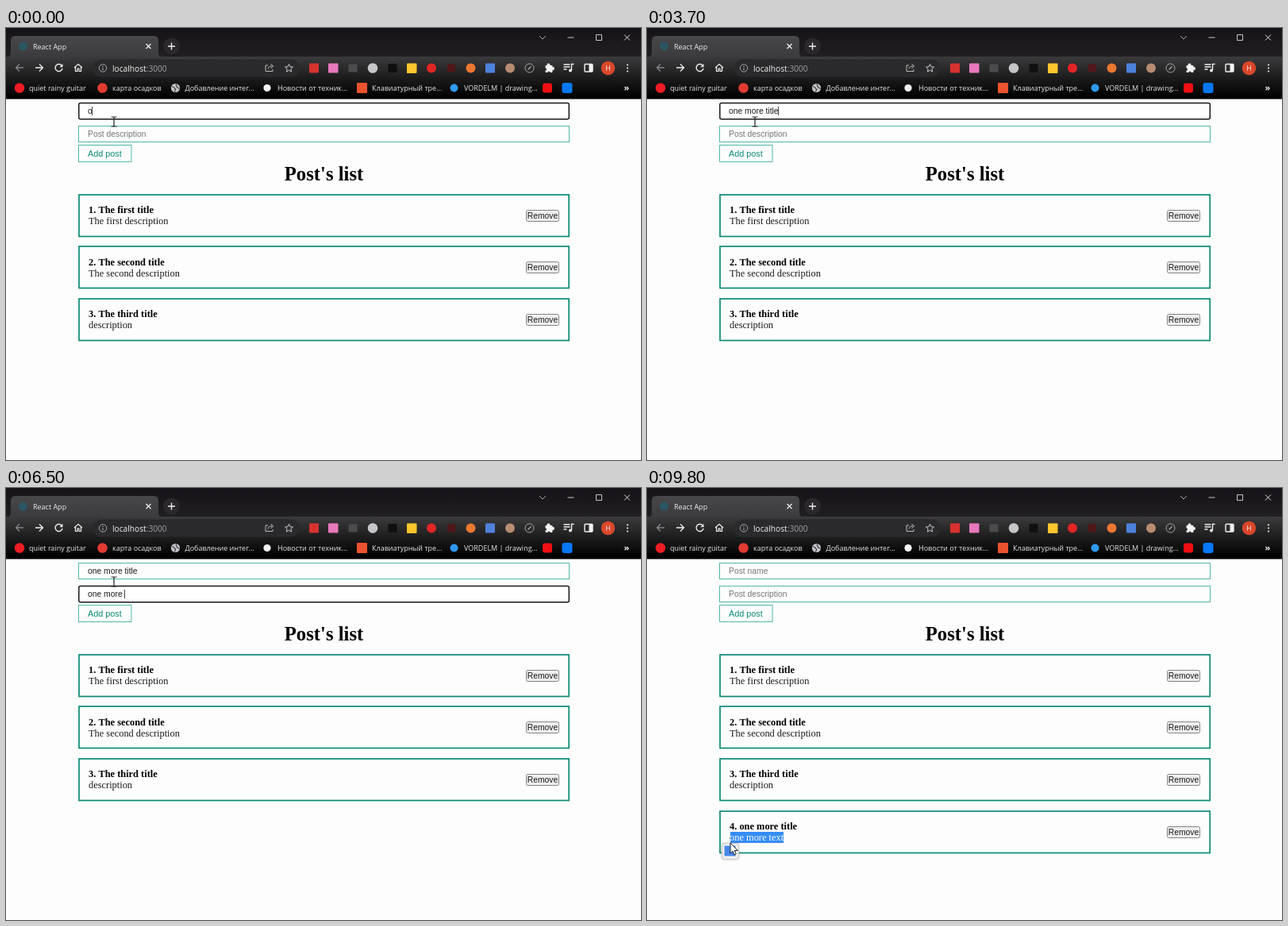
An HTML page with a canvas that plays this animation: 800x544 px, repeating every 9.9 s.

```html
<!DOCTYPE html>
<html lang="en">
<head>
<meta charset="utf-8">
<title>React App</title>
<style>
html, body { margin: 0; width: 100%; height: 100%; overflow: hidden; background: #fefdfe; }
canvas { display: block; width: 800px; height: 544px; }
</style>
</head>
<body>
<canvas id="stage" width="800" height="544"></canvas>
<script>
const ctx = document.getElementById('stage').getContext('2d');
const LOOP = 9900, STEP = 100;
const UI = '"Open Sans", "Noto Sans", sans-serif';
const SANS = '"Liberation Sans", Arial, sans-serif';
const SERIF = '"Liberation Serif", "Times New Roman", serif';
const GREEN = '#0a8a76', PALE = '#4fb7a4', INK = '#1a1a1a';

const TITLE = 'one more title', BODY = 'one more text';
const TITLE_KEYS = [0, 300, 500, 700, 1000, 1200, 1500, 1700, 2000, 2300, 2600, 2900, 3200, 3500];
const BODY_KEYS = [4500, 4700, 4900, 5100, 5400, 5700, 5900, 6200, 6500, 6700, 7000, 7200, 7500];
const TAB_KEY = 4200, ENTER = 7900, PRESS = 8900, RELEASE = 9300, POPUP = 9500;
const MOUSE = [[ENTER, 136, 118], [8300, 158, 300], [8600, 185, 466], [PRESS, 173, 443], [RELEASE, 105, 447]];

function text(str, x, y, font, color, align = 'left') {
  ctx.font = font;
  ctx.fillStyle = color;
  ctx.textAlign = align;
  ctx.fillText(str, x, y);
}

function rect(x, y, w, h, color) {
  ctx.fillStyle = color;
  ctx.fillRect(x, y, w, h);
}

function frame(x, y, w, h, color, lw = 1) {
  ctx.strokeStyle = color;
  ctx.lineWidth = lw;
  ctx.strokeRect(x, y, w, h);
}

function round(x, y, w, h, r, fill, stroke, lw = 1) {
  ctx.beginPath();
  ctx.roundRect(x, y, w, h, r);
  paint(fill, stroke, lw);
}

function disc(x, y, r, fill, stroke, lw = 1) {
  ctx.beginPath();
  ctx.arc(x, y, r, 0, Math.PI * 2);
  paint(fill, stroke, lw);
}

function paint(fill, stroke, lw) {
  if (fill) { ctx.fillStyle = fill; ctx.fill(); }
  if (stroke) { ctx.strokeStyle = stroke; ctx.lineWidth = lw; ctx.stroke(); }
}

function icon(d, color, x, y, lw = 1.2, fill) {
  ctx.save();
  ctx.translate(x, y);
  const path = new Path2D(d);
  if (fill) { ctx.fillStyle = fill; ctx.fill(path); }
  if (color) { ctx.strokeStyle = color; ctx.lineWidth = lw; ctx.stroke(path); }
  ctx.restore();
}

function shade(y0, y1, c0, c1) {
  const g = ctx.createLinearGradient(0, y0, 0, y1);
  g.addColorStop(0, c0);
  g.addColorStop(1, c1);
  return g;
}

function drawTabs() {
  rect(0, 0, 800, 37, shade(0, 37, '#151317', '#211f22'));
  rect(0, 36, 800, 53.5, shade(36, 88, '#3b3a3c', '#000'));
  ctx.beginPath();
  ctx.moveTo(2, 37);
  ctx.quadraticCurveTo(6, 36, 6, 31);
  ctx.lineTo(6, 16);
  ctx.quadraticCurveTo(6, 10, 12, 10);
  ctx.lineTo(186, 10);
  ctx.quadraticCurveTo(192, 10, 192, 16);
  ctx.lineTo(192, 31);
  ctx.quadraticCurveTo(192, 36, 197, 37);
  paint(shade(10, 37, '#48474a', '#3b3a3c'));
  disc(21.5, 23, 5.5, '#2a5763');
  text('React App', 34, 26.5, '9px ' + UI, '#eee');
  icon('M-3-3L3 3M3-3L-3 3', '#eee', 179.5, 23, 1.3);
  disc(208.5, 23, 10.5, '#2a282c');
  icon('M-4.5 0H4.5M0-4.5V4.5', '#eee', 208.5, 23, 1.4);
  icon('M-4-2L0 2L4-2', '#aaa', 676, 12, 1);
  icon('M-4 0H4', '#c8c8c8', 711.5, 12, 1);
  icon('M-3.5-3.5H3.5V3.5H-3.5Z', '#c8c8c8', 747, 12, 1);
  icon('M-3.5-3.5L3.5 3.5M3.5-3.5L-3.5 3.5', '#ddd', 782.5, 12, 1);
}

function drawToolbar() {
  icon('M5 0H-4.5M0-4.5L-4.5 0L0 4.5', '#858486', 17, 50, 1.3);
  icon('M-5 0H4.5M0-4.5L4.5 0L0 4.5', '#eee', 42, 50, 1.3);
  icon('M3.6-2.8A4.5 4.5 0 1 0 4.5 1', '#eee', 66.5, 50, 1.4);
  icon('M5-5V-.8H.8Z', null, 66.5, 50, 1, '#eee');
  icon('M-5 0L0-4.5L5 0M-3.5-1V4.5H-1V1H1V4.5H3.5V-1', '#eee', 91, 50, 1.2);
  round(109, 39.5, 261, 22, 11, '#2a292b');
  disc(122, 50.5, 4.7, null, '#aaa', 1);
  icon('M0-2.5V-1.2M0 0V2.6', '#bbb', 122, 50.5, 1.1);
  text('localhost', 134, 54.5, '10.2px ' + UI, '#f1f1f1');
  const hostWidth = ctx.measureText('localhost').width;
  text(':3000', 134 + hostWidth, 54.5, '10.2px ' + UI, '#a0a0a2');
  icon('M-2-3H-5V4.5H4V2M-2 1.5C-1.5-1 0-2 3-2M1.5-4.5L4.8-2L1.5.8', '#bbb', 332, 50, 1);
  icon('M0-5L1.5-1.7L5-1.4L2.4 1L3.1 4.6L0 2.7L-3.1 4.6L-2.4 1L-5-1.4L-1.5-1.7Z', '#ccc', 356.5, 50.5, 1);

  round(382, 44.5, 12, 12, 1, '#d8322f');
  round(406, 44.5, 12.5, 12, 1, '#e879bd');
  round(431.5, 45.5, 11, 10, 1, '#4c4b4d');
  disc(462, 50.5, 6.3, '#c6c6c8');
  round(481.5, 45, 11, 11, 1, '#101010');
  round(505, 44.5, 12.5, 12.5, 1, '#fbc52d');
  disc(536, 50.5, 6, '#e22525');
  round(556, 45.5, 10, 10, 1, '#51171a');
  disc(585.5, 50.5, 6, '#ec7730');
  round(604, 44.5, 12, 12, 1, '#4d82dc');
  disc(635, 50.5, 6, '#b78d72');
  disc(659.5, 50.5, 5.5, null, '#aaa', 1);
  icon('M-2 2L2-2', '#aaa', 659.5, 50.5, 1.2);

  round(679.5, 47, 9, 9, 1, '#f4f4f4');
  disc(683.5, 46.5, 2, '#f4f4f4');
  disc(689, 51, 2, '#f4f4f4');
  disc(679.5, 52, 1.5, '#252426');
  disc(684, 56, 1.5, '#252426');
  icon('M-6-4H2M-6-1H2M-6 2H-2M4 3V-4.5H7', '#eee', 708.5, 50, 1.4);
  disc(711, 53.5, 2, '#eee');
  round(729, 45.5, 10, 9.5, 1, null, '#f2f2f2', 1.4);
  rect(734.5, 45.5, 4.5, 9.5, '#f2f2f2');
  disc(758.5, 50.5, 8.7, '#d9472b');
  text('H', 758.5, 54, '9px ' + UI, '#f5e8e4', 'center');
  for (const y of [46.5, 50.5, 54.5]) disc(783, y, 1.1, '#eee');
}

function drawBookmarks() {
  const labels = [
    ['quiet rainy guitar', 29], ['карта осадков', 134], ['Добавление интег...', 225.5],
    ['Новости от техник...', 342], ['Клавиатурный тре...', 461], ['VORDELM | drawing...', 577]
  ];
  for (const [label, x] of labels) text(label, x, 78.5, '9px ' + UI, '#e6e6e6');
  disc(17, 75.5, 6.3, '#f01c23');
  disc(121.5, 75.5, 6.3, '#e13b32');
  disc(213.5, 75.5, 5.6, '#c2c4c8');
  icon('M-4.5-2C-1-1-1 1 0 1.5C1 2-1 3-1 5M1-5C0-3 2-2 2-1C3 0 4 0 5 1', '#3c3d40', 213.5, 75.5, 1.2);
  disc(329, 75.5, 4.6, '#f4f4f4');
  round(442, 69, 13, 13, 1, '#eb522f');
  disc(564.5, 75.5, 5, '#2e9af0');
  round(676, 69.5, 12, 12, 3, '#f00f12');
  round(700.5, 69, 13, 13, 3, '#0878f8');
  text('»', 782, 78.5, 'bold 11px ' + UI, '#eee', 'center');
}

function drawField(y, value, placeholder, focused, caret) {
  if (focused) round(91.8, y + .5, 617.5, 20.2, 2, '#fff', '#1a161b', 1.5);
  else frame(91.5, y + .5, 618, 20, PALE);
  text(value || placeholder, 103, y + 14, '10.33px ' + SANS, value ? INK : '#757575');
  if (focused && caret) rect(Math.floor(103 + ctx.measureText(value).width), y + 5, 1, 11, '#444');
}

function drawCard(index, title, body) {
  const y = 209 + index * 65.7, top = Math.floor(y);
  frame(92, top + 1, 617.2, 52.5, GREEN, 1.7);
  text(`${index + 1}. ${title}`, 104, Math.round(y + 24), 'bold 12.4px ' + SERIF, '#000');
  text(body, 104, Math.round(y + 38), '12.4px ' + SERIF, INK);
  round(655.5, top + 20.5, 41, 14, 2, '#efefef', '#858585', 1);
  text('Remove', 676, top + 31, '10.33px ' + SANS, INK, 'center');
}

function drawSelection(from) {
  ctx.font = '12.4px ' + SERIF;
  const end = 104 + ctx.measureText(BODY).width;
  const left = Math.max(104, from);
  if (left >= end) return;
  ctx.save();
  ctx.beginPath();
  ctx.rect(left, 433, end - left, 14);
  ctx.clip();
  rect(left, 433, end - left, 14, '#358cf6');
  text(BODY, 104, 444, '12.4px ' + SERIF, '#fff');
  ctx.restore();
}

function drawPopup() {
  ctx.save();
  ctx.shadowColor = 'rgba(0,0,0,.25)';
  ctx.shadowBlur = 2;
  round(94.5, 447.5, 21, 20, 3, '#f5f5f5', '#d0d0d0', 1);
  ctx.restore();
  rect(97.5, 450.5, 14, 13, '#4687eb');
}

function mouseAt(t) {
  if (t <= MOUSE[0][0]) return MOUSE[0].slice(1);
  for (let i = 1; i < MOUSE.length; i++) {
    const [t0, x0, y0] = MOUSE[i - 1], [t1, x1, y1] = MOUSE[i];
    if (t > t1) continue;
    const p = (t - t0) / (t1 - t0), e = p * p * (3 - 2 * p);
    return [x0 + (x1 - x0) * e, y0 + (y1 - y0) * e];
  }
  return MOUSE[MOUSE.length - 1].slice(1);
}

function drawMouse(t, x, y) {
  const beam = t <= ENTER || (t >= PRESS && t < POPUP);
  if (beam) icon('M-3.5-6H-1Q0-6 0-5Q0-6 1-6H3.5M0-5V5M-3.5 6H-1Q0 6 0 5Q0 6 1 6H3.5', '#222', x, y, 1.2);
  else icon('M0 0V13L3 10.3L5 15L7.3 14L5.2 9.5H9.3Z', '#222', x, y, 1, '#fff');
}

function draw(t) {
  const typed = keys => keys.filter(k => k <= t).length;
  const posted = t >= ENTER;
  const title = posted ? '' : TITLE.slice(0, typed(TITLE_KEYS));
  const body = posted ? '' : BODY.slice(0, typed(BODY_KEYS));
  const lastKey = [...TITLE_KEYS, TAB_KEY, ...BODY_KEYS, ENTER].filter(k => k <= t).pop();
  const caret = (t - lastKey) % 1000 < 500;
  const [mx, my] = mouseAt(t);

  rect(0, 0, 800, 544, '#fefdfe');
  drawTabs();
  drawToolbar();
  drawBookmarks();
  drawField(94, title, 'Post name', t < TAB_KEY, caret);
  drawField(123, body, 'Post description', t >= TAB_KEY && t < PRESS, caret);
  frame(91.5, 147.5, 66.5, 21, PALE);
  text('Add post', 103, 162, '10.85px ' + SANS, GREEN);
  text("Post's list", 400.5, 192, 'bold 24.7px ' + SERIF, '#000', 'center');
  drawCard(0, 'The first title', 'The first description');
  drawCard(1, 'The second title', 'The second description');
  drawCard(2, 'The third title', 'description');
  if (posted) drawCard(3, TITLE, BODY);
  if (t >= PRESS) drawSelection(mx);
  if (t >= POPUP) drawPopup();
  drawMouse(t, mx, my);
}

function tick() {
  draw(Math.floor((performance.now() % LOOP) / STEP) * STEP);
  requestAnimationFrame(tick);
}
tick();
</script>
</body>
</html>
```
